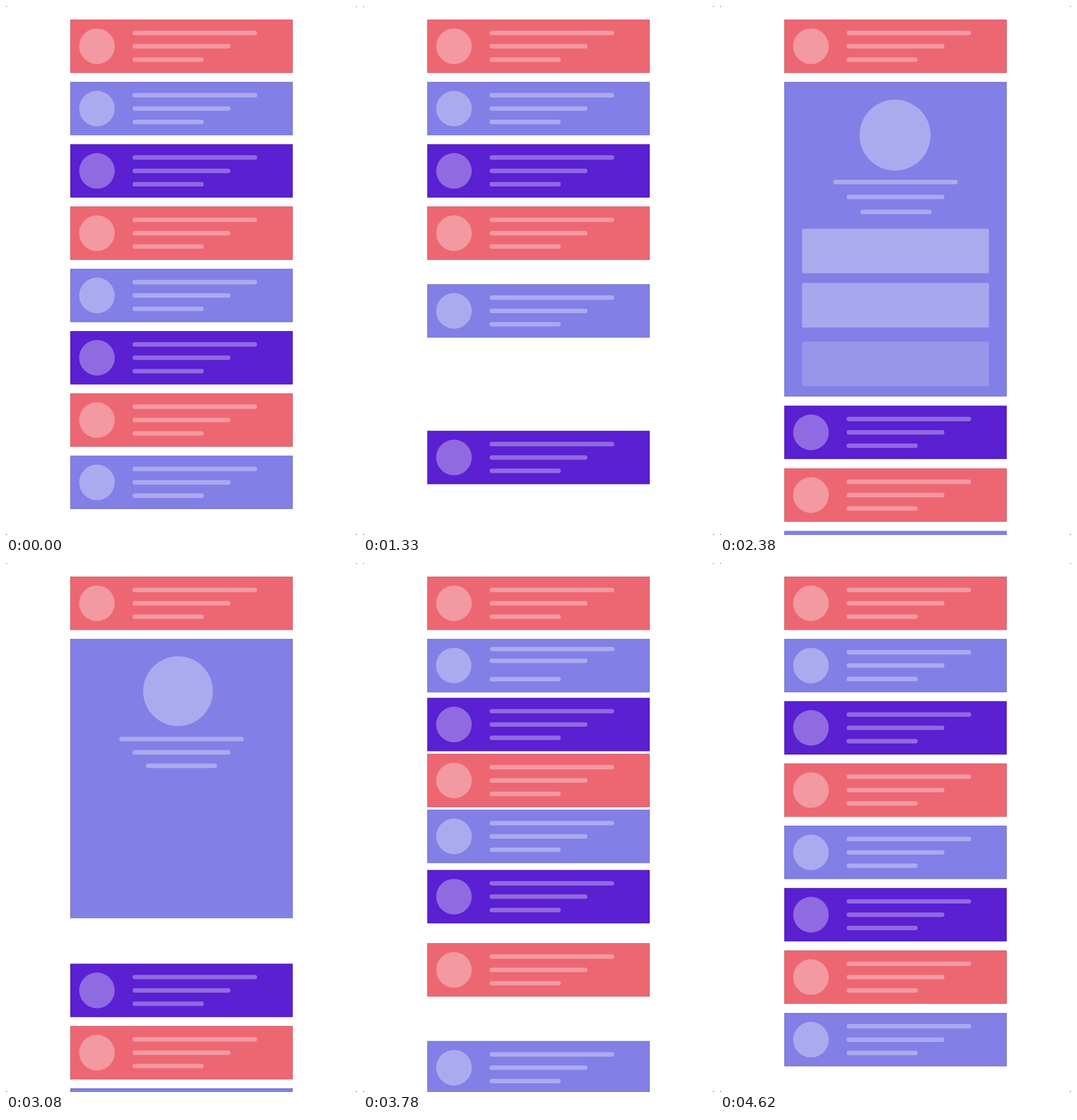
An HTML page that plays this animation: 568 by 856 pixels, repeating every 4.69 s.

```html
<!DOCTYPE html>
<html lang="en">
<head>
<meta charset="utf-8">
<title>Expanding list</title>
<style>
  html, body { margin: 0; width: 100%; height: 100%; overflow: hidden; background: #fff; }
  svg { display: block; width: 568px; height: 856px; }
</style>
</head>
<body>
<svg id="stage" viewBox="0 0 568 856">
  <defs><clipPath id="clip"><rect id="clipBox" x="104" width="360"/></clipPath></defs>
</svg>
<script>
const LOOP = 4690, STEP = 70;
const U = 14.4;                       // layout unit
const LEFT = 104, TOP = 22, WIDTH = 25 * U, ROW = 6 * U, PITCH = 7 * U;
const GROW = 29.5 * U;                // extra height of the open card
const OPEN_CARD = 1, COUNT = 8;
const COLORS = ['#ed6773', '#8280e6', '#5a20d1'];
const LINE_W = [14 * U, 11 * U, 8 * U];

// Staggered starts, from the open card down: the last card leaves first
const OPEN_AT = [1492, 1419, 1344, 1290, 1208, 1126, 1045];
const CLOSE_AT = [3015, 3104, 3195, 3277, 3356, 3437, 3518];

// Start times of the parts inside the open card
const DISC = { open: 1475, close: 3047 };
const LINES = [
  { open: 1621, close: 3195 },
  { open: 1729, close: 3255 },
  { open: 1795, close: 3462 }
];
const BOXES_END = 3010;
const boxStart = i => 1890 + 177 * i;

const stage = document.getElementById('stage');
const clipBox = document.getElementById('clipBox');

function set(el, attrs) {
  for (const k in attrs) el.setAttribute(k, attrs[k]);
}

function add(parent, tag, attrs) {
  const el = document.createElementNS('http://www.w3.org/2000/svg', tag);
  set(el, attrs);
  parent.appendChild(el);
  return el;
}

// Damped spring from 0 to 1; time in ms
function spring(ms, decay, freq) {
  if (ms <= 0) return 0;
  const s = ms / 1000, a = freq * s;
  return 1 - Math.exp(-decay * s) * (Math.cos(a) + decay / freq * Math.sin(a));
}
const soft = ms => spring(ms, 6.02, 7.11);
const firm = ms => spring(ms, 11, 4.7);
const phase = (t, part) => soft(t - part.open) - soft(t - part.close);
const mix = (a, b, p) => a + (b - a) * p;

function makeCard(i) {
  const y = TOP + PITCH * i;
  const g = add(stage, 'g', {});
  const back = add(g, 'rect', {
    x: LEFT, y, width: WIDTH, height: ROW, fill: COLORS[i % 3]
  });
  const edge = add(g, 'rect', {
    x: LEFT + 0.5, y: y + 0.5, width: WIDTH - 1, height: ROW - 1,
    fill: 'none', stroke: '#000', 'stroke-opacity': 0.12
  });
  const inner = add(g, 'g', { fill: '#fff', 'fill-opacity': 0.33 });
  const disc = add(inner, 'circle', { cx: LEFT + 3 * U, cy: y + 3 * U, r: 2 * U });
  const lines = LINE_W.map((width, n) => add(inner, 'rect', {
    x: LEFT + 7 * U, y: y + 1.5 * U * (n + 1) - U / 4, width, height: U / 2, rx: U / 4
  }));
  const k = i - OPEN_CARD;
  return { y, g, back, edge, inner, disc, lines, open: OPEN_AT[k], close: CLOSE_AT[k] };
}

const cards = Array.from({ length: COUNT }, (_, i) => makeCard(i));
const main = cards[OPEN_CARD];
main.inner.setAttribute('clip-path', 'url(#clip)');
const boxes = [0, 1, 2].map(() => add(main.inner, 'rect', {
  x: LEFT + 2 * U, width: 21 * U, height: 5 * U, rx: 2
}));

// Tiny dark corners of the window
for (const [x, y, sx, sy] of [[0, 0, 1, 1], [568, 0, -1, 1], [0, 856, 1, -1], [568, 856, -1, -1]]) {
  add(stage, 'path', {
    d: 'M0 0H2.4Q0 0 0 2.4Z', fill: '#333',
    transform: `translate(${x} ${y}) scale(${sx} ${sy})`
  });
}

function drawMain(t) {
  const y = main.y;
  const height = ROW + GROW * phase(t, main);
  set(main.back, { height });
  set(main.edge, { height: height - 1 });
  set(clipBox, { y, height });

  const d = phase(t, DISC);
  set(main.disc, {
    cx: LEFT + mix(3 * U, WIDTH / 2, d),
    cy: y + mix(3 * U, 6 * U, d),
    r: mix(2 * U, 4 * U, d)
  });

  main.lines.forEach((line, n) => {
    const p = phase(t, LINES[n]);
    set(line, {
      x: LEFT + mix(7 * U, (WIDTH - LINE_W[n]) / 2, p),
      y: y + 1.5 * U * (n + 1) - U / 4 + 9.75 * U * p
    });
  });

  boxes.forEach((box, n) => {
    const p = t < BOXES_END ? firm(t - boxStart(n)) : 0;
    set(box, {
      y: y + 16.5 * U + 6 * U * n + 20 * (1 - p),
      opacity: Math.min(1, p)
    });
  });
}

function draw(t) {
  for (const card of cards.slice(OPEN_CARD + 1)) {
    const shift = GROW * phase(t, card);
    card.g.setAttribute('transform', `translate(0 ${shift.toFixed(2)})`);
  }
  drawMain(t);
}

const begin = performance.now();
function tick(now) {
  const t = Math.max(0, now - begin) % LOOP;
  draw(Math.floor(t / STEP) * STEP);
  requestAnimationFrame(tick);
}
draw(0);
requestAnimationFrame(tick);
</script>
</body>
</html>
```
